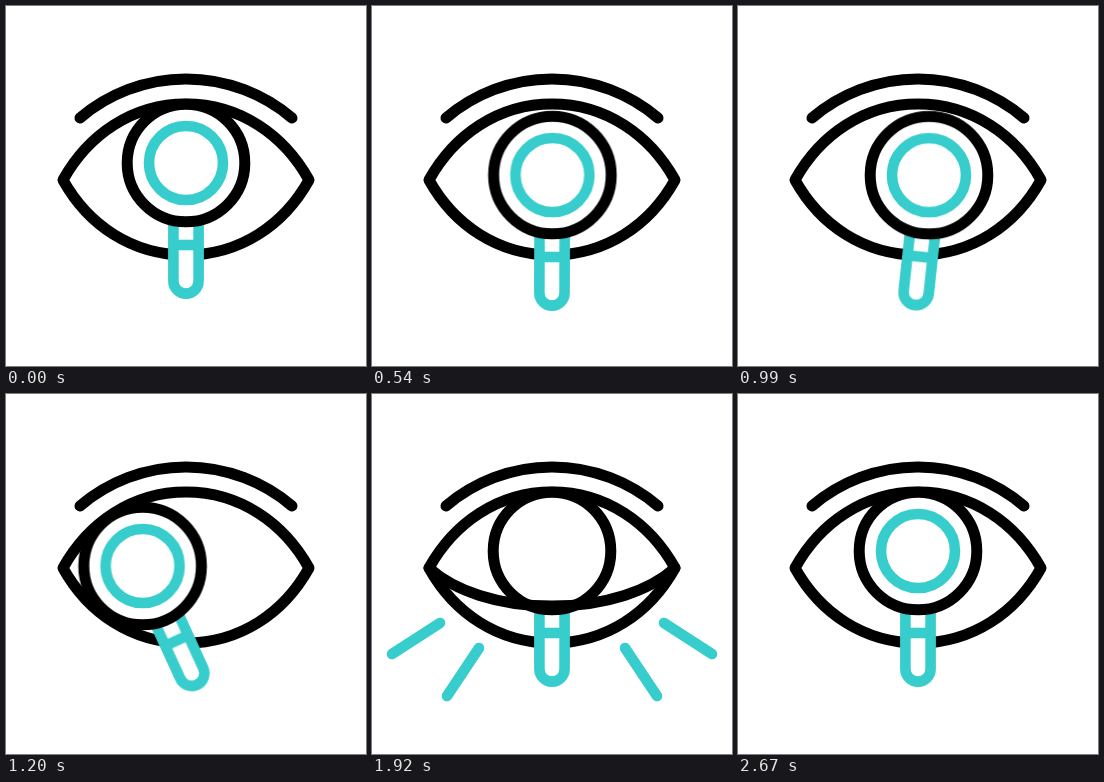
An HTML page for the animation above (2.7 s loop, 360 by 360 pixels).

```html
<!DOCTYPE html>
<html lang="en">
<head>
<meta charset="utf-8">
<title>Eye examination</title>
<style>
  html, body { margin: 0; width: 100%; height: 100%; overflow: hidden; background: #fff; }
  svg { display: block; width: 100%; height: 100%; }

  .line { fill: none; stroke: #000; stroke-width: 11; stroke-linecap: round; stroke-linejoin: round; }
  .teal { fill: none; stroke: #37cdcc; stroke-width: 10.6; }
  .white { fill: #fff; }

  .x, .y, .turn, .lid path, .rays, .rays path {
    animation: 2.7s cubic-bezier(.37, 0, .63, 1) infinite;
  }
  .x { animation-name: slide; }
  .y { animation-name: dip; }
  .turn { animation-name: turn; }

  @keyframes slide {
    0%, 59.5%, 100% { transform: translateX(0); }
    11.11%, 13.33%, 44.44%, 47.78% { transform: translateX(-43.4px); }
    26.67%, 31.11% { transform: translateX(43.4px); }
  }
  @keyframes dip {
    0%, 57.78%, 100% { transform: translateY(0); }
    11.11%, 13.33%, 26.67%, 31.11%, 44.44%, 47.78% { transform: translateY(15px); }
    20%, 37.78% { transform: translateY(12px); }
  }
  @keyframes turn {
    0%, 62.22%, 100% { transform: rotate(0deg); }
    11.11%, 13.33%, 44.44%, 54.44% { transform: rotate(-24.6deg); }
    26.67%, 31.11% { transform: rotate(24.6deg); }
  }

  /* Eyelid: a white cover inside the lens, and its edge */
  .lid, .rays { visibility: hidden; animation: 2.7s step-end infinite; }
  .lid { animation-name: showLid; }
  .rays { animation-name: showRays; }
  .lid .cover { animation-name: cover; }
  .lid .edge { animation-name: edge; }
  .rays path { stroke-linecap: round; stroke-dasharray: 1 2; animation-name: ray; }

  @keyframes showLid {
    0%, 92%, 100% { visibility: hidden; }
    62.22% { visibility: visible; }
  }
  @keyframes cover {
    0%, 62.22%, 92%, 100% { d: path("M57 0V174C82 129 126 98 180 98S278 129 303 174V0Z"); }
    70%, 82% { d: path("M57 0V174C82 196.5 126 212 180 212S278 196.5 303 174V0Z"); }
  }
  @keyframes edge {
    0%, 62.22%, 92%, 100% { d: path("M57 174C82 129 126 98 180 98S278 129 303 174"); }
    70%, 82% { d: path("M57 174C82 196.5 126 212 180 212S278 196.5 303 174"); }
  }
  @keyframes showRays {
    0%, 86%, 100% { visibility: hidden; }
    64% { visibility: visible; }
  }
  @keyframes ray {
    0%, 64%, 86%, 100% { stroke-dashoffset: 1; }
    70%, 80% { stroke-dashoffset: 0; }
  }
</style>
</head>
<body>
<svg viewBox="0 0 360 360">
  <clipPath id="pupil"><circle cx="180" cy="157" r="58"/></clipPath>

  <path class="line" d="M74 112A163.6 163.6 0 0 1 286 112"/>
  <path class="line" d="M57 174C82 129 126 98 180 98S278 129 303 174C278 219 234 249 180 249S82 219 57 174Z"/>

  <g class="x"><g class="y"><g transform="translate(180 157)">
    <g class="turn">
      <path class="teal" style="fill:#fff" d="M-12.6 56V118a12.6 12.6 0 0 0 25.2 0V56"/>
      <path class="teal" d="M-12.6 82H12.6"/>
    </g>
    <circle class="white" r="59"/>
    <circle class="teal" r="37"/>
  </g></g></g>

  <g class="lid" clip-path="url(#pupil)">
    <path class="white cover" d="M57 0V174C82 129 126 98 180 98S278 129 303 174V0Z"/>
  </g>

  <g class="x"><g class="y">
    <circle class="line" cx="180" cy="157" r="58.8"/>
  </g></g>

  <g class="lid">
    <path class="line edge" d="M57 174C82 129 126 98 180 98S278 129 303 174"/>
  </g>

  <g class="rays">
    <path class="teal" pathLength="1" d="M68 229L20 260"/>
    <path class="teal" pathLength="1" d="M107 254L75 302"/>
    <path class="teal" pathLength="1" d="M253 254L285 302"/>
    <path class="teal" pathLength="1" d="M292 229L340 260"/>
  </g>
</svg>
</body>
</html>
```
